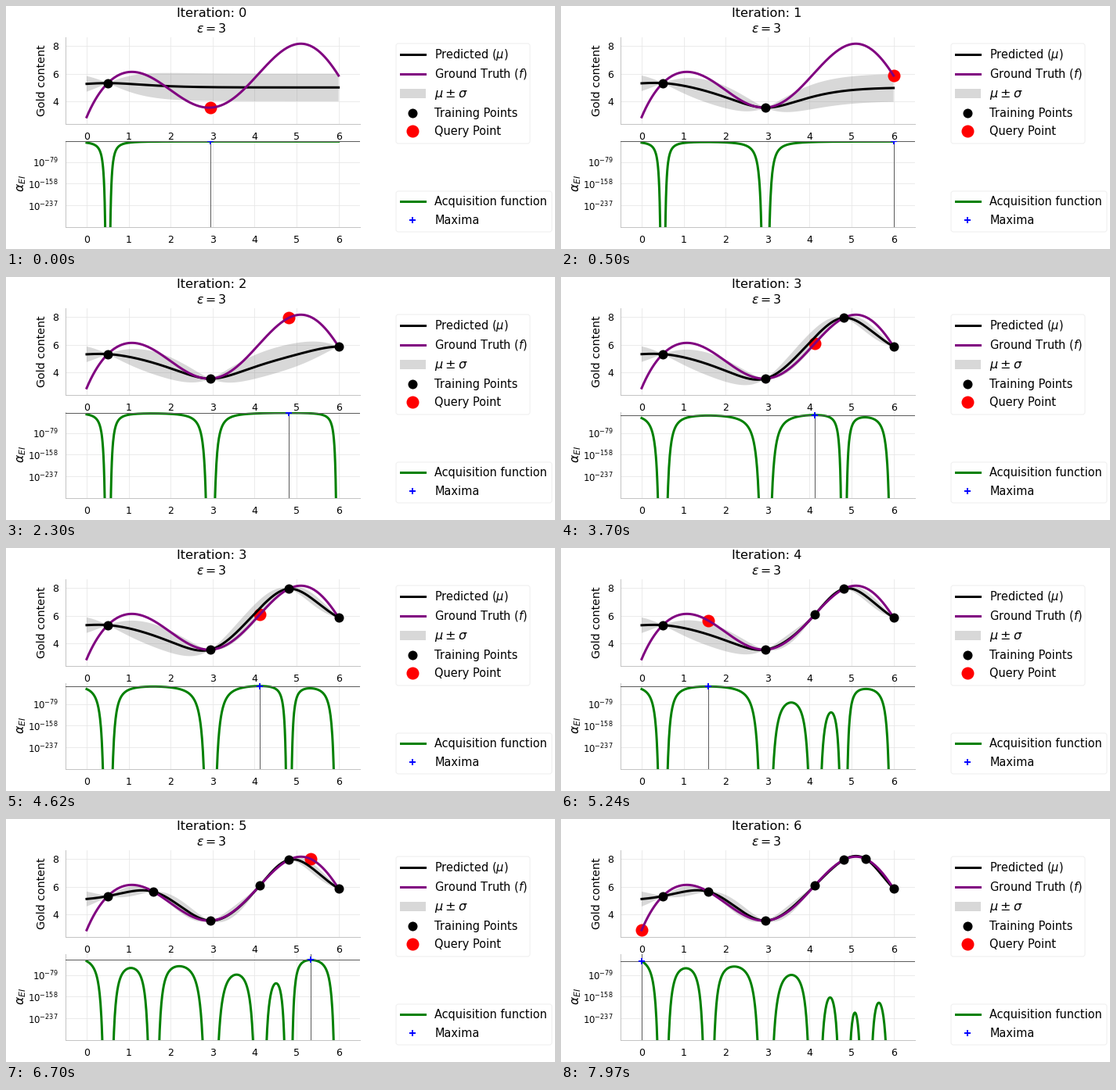
Animation of 701 by 311 pixels, one loop 8 s. Source, as a matplotlib script:

```python
import math

import matplotlib.pyplot as plt
import numpy as np
from matplotlib.animation import FuncAnimation
from matplotlib.patches import FancyBboxPatch, Rectangle

W, H, DPI = 701, 311, 64
LOOP, TICK = 8000, 20
STARTS = [0, 500, 2300, 3700, 5240, 6700, 7970]
SAMPLES = [0.503, 2.948, 6.0, 4.815, 4.127, 1.593, 5.34, 0.0]
EPS = 3
GRID, SPINE, RULE = "#e6e6e6", "#c4c4c4", "#5c5c5c"

plt.rcParams["font.family"] = "DejaVu Sans"
plt.rcParams["mathtext.fontset"] = "dejavusans"


def px(n):
    """Pixels to points."""
    return n * 72 / DPI


def fit_truth(degree=8):
    """Smooth curve through a few values and three stationary points."""
    xs = np.array([0, 0.503, 1.07, 1.593, 1.88, 2.948, 3.75, 4.127, 4.815, 5.1, 5.34, 6])
    ys = np.array([2.86, 5.27, 6.17, 5.58, 5.1, 3.49, 4.97, 6.08, 7.9, 8.17, 8.02, 5.86])
    flat = np.array([1.07, 2.93, 5.1])
    k = np.arange(degree + 1)
    t, s = (xs - 3) / 3, (flat - 3) / 3
    values = t[:, None] ** k
    slopes = k * s[:, None] ** np.maximum(k - 1, 0) / 3
    rows = np.vstack([values, slopes])
    rhs = np.concatenate([ys, np.zeros(len(flat))])
    coef = np.linalg.lstsq(rows, rhs, rcond=None)[0]
    return lambda x: np.polyval(coef[::-1], (np.asarray(x) - 3) / 3)


def matern(a, b):
    r = math.sqrt(5) * np.abs(a[:, None] - b[None, :])
    return (1 + r + r * r / 3) * np.exp(-r)


def predict(x, xt, yt, mean=5):
    gain = np.linalg.solve(matern(xt, xt) + 1e-9 * np.eye(len(xt)), matern(xt, x))
    mu = mean + gain.T @ (yt - mean)
    var = 1 - np.sum(gain * matern(xt, x), axis=0)
    return mu, np.sqrt(np.maximum(var, 1e-9))


def log_ei(mu, sd, best):
    """log10 of expected improvement, stable far in the tail."""
    z = (mu - best - EPS) / sd
    cdf = 0.5 * np.vectorize(math.erfc)(-z / math.sqrt(2))
    pdf = np.exp(-z * z / 2) / math.sqrt(2 * math.pi)
    near = np.log(np.maximum(pdf + z * cdf, 1e-300))
    q = 1 / np.maximum(z * z, 25)
    tail = -z * z / 2 - 0.5 * math.log(2 * math.pi) + np.log(q * (1 - 3 * q + 15 * q * q))
    total = np.where(z < -6, tail, near) + np.log(sd)
    return np.maximum(total / math.log(10), -2000)


truth = fit_truth()
x = np.linspace(0, 6, 601)


def solve(step):
    xt = np.array(SAMPLES[:step + 1])
    yt = truth(xt)
    mu, sd = predict(x, xt, yt)
    return xt, yt, mu, sd, log_ei(mu, sd, yt.max())


states = [solve(i) for i in range(len(STARTS))]

fig = plt.figure(figsize=(W / DPI, H / DPI), dpi=DPI, facecolor="white")


def add_axes(left, top, right, bottom):
    return fig.add_axes([left / W, 1 - bottom / H, (right - left) / W, (bottom - top) / H])


def panel(top, bottom, ylim, yticks, labels):
    ax = add_axes(76, top, 451.6, bottom)
    ax.set(xlim=(-0.503, 6.503), ylim=ylim, xticks=range(7))
    ax.set_yticks(yticks, labels)
    ax.grid(color=GRID, lw=px(0.8))
    ax.set_axisbelow(True)
    ax.spines[["top", "right"]].set_visible(False)
    ax.spines[["left", "bottom"]].set(color=SPINE, lw=px(1))
    ax.tick_params(length=0, labelsize=px(12.5))
    ax.tick_params(axis="x", pad=px(10))
    ax.tick_params(axis="y", pad=px(9))
    return ax


top_ax = panel(39.5, 150.8, (2.37, 8.66), [4, 6, 8], ["4", "6", "8"])
low_ax = panel(172.7, 283.2, (-316.7, -2.1), [-79, -158, -237],
               [f"$10^{{{e}}}$" for e in (-79, -158, -237)])
low_ax.tick_params(axis="y", labelsize=px(11.6))

# Upper panel
band, = top_ax.fill([0, 0, 0], [3, 3, 3], color="gray", alpha=0.3, lw=0)
mean_line, = top_ax.plot([], [], color="black", lw=px(3))
top_ax.plot(x, truth(x), color="purple", lw=px(3))
query, = top_ax.plot([], [], "o", color="red", ms=px(16), mew=0, zorder=1.5)
trained, = top_ax.plot([], [], "o", color="black", ms=px(12), mew=0, zorder=4)

# Lower panel
ei_line, = low_ax.plot([], [], color="green", lw=px(3))
v_rule = low_ax.axvline(0, color=RULE, lw=px(1), zorder=3)
h_rule = low_ax.axhline(0, color=RULE, lw=px(1), zorder=3)
peak, = low_ax.plot([], [], "P", color="blue", ms=px(8.3), mew=0, zorder=4)

# Titles and legends in pixel coordinates
stage = add_axes(0, 0, W, H)
stage.set(xlim=(0, W), ylim=(H, 0))
stage.axis("off")


def label(tx, ty, s, size, **kw):
    return stage.text(tx, ty, s, fontsize=px(size), **kw)


def frame(top, right, bottom):
    stage.add_patch(FancyBboxPatch((498, top), right - 498, bottom - top, fc="white",
                                   ec="#efefef", lw=px(1),
                                   boxstyle="round,pad=0,rounding_size=3"))


def entry(y, s, size=14.5, line=None, marker=None, color=None, ms=0):
    if line:
        stage.plot([503.5, 534.5], [y, y], color=line, lw=px(3))
    if marker:
        stage.plot([518.9], [y], marker, color=color, ms=px(ms), mew=0)
    label(547.2, y + 5, s, size)


title = label(262.7, 13.5, "", 16.1, ha="center")
label(262.3, 33.5, r"$\varepsilon = 3$", 15.7, ha="center")
label(45.5, 95, "Gold content", 14.3, rotation=90, ha="center", va="center")
label(20, 227.5, r"$\alpha_{EI}$", 15.5, rotation=90, ha="center", va="center")

frame(48, 669, 176)
entry(62, r"Predicted ($\mu$)", line="black")
entry(86.5, r"Ground Truth ($f$)", line="purple")
stage.add_patch(Rectangle((502.5, 105.5), 33, 12, fc="gray", alpha=0.3, lw=0))
entry(111.5, r"$\mu \pm \sigma$", 16)
entry(136.7, "Training Points", marker="o", color="black", ms=12)
entry(160.3, "Query Point", marker="o", color="red", ms=16)

frame(237, 697, 289)
entry(249.7, "Acquisition function", line="green")
entry(273.8, "Maxima", marker="P", color="blue", ms=8.3)


def update(i):
    now = i * TICK + TICK / 2
    step = int(np.searchsorted(STARTS, now, side="right")) - 1
    xt, yt, mu, sd, ei = states[step]
    xq, high = SAMPLES[step + 1], ei.max()
    title.set_text(f"Iteration: {step}")
    band.set_xy(np.column_stack([np.r_[x, x[::-1]], np.r_[mu + sd, (mu - sd)[::-1]]]))
    mean_line.set_data(x, mu)
    trained.set_data(xt, yt)
    query.set_data([xq], [truth(xq)])
    ei_line.set_data(x, ei)
    v_rule.set_xdata([xq, xq])
    h_rule.set_ydata([high, high])
    peak.set_data([xq], [high])
    return title, band, mean_line, trained, query, ei_line, v_rule, h_rule, peak


anim = FuncAnimation(fig, update, frames=LOOP // TICK, interval=TICK,
                     init_func=lambda: update(0), repeat=True, repeat_delay=0)
plt.show()
```
